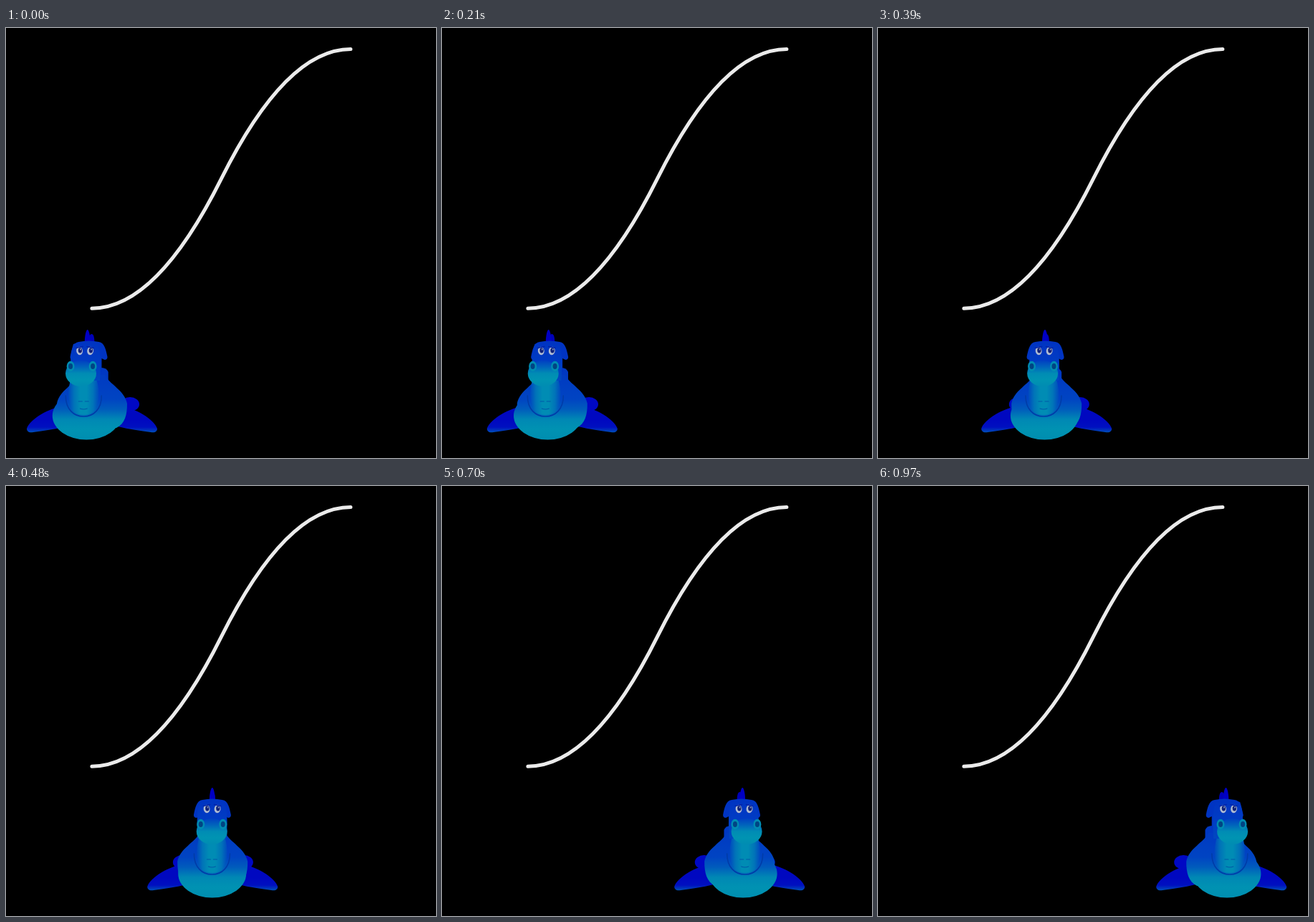
An HTML page with a canvas that plays this animation: 600 px wide and 600 px high, repeating every 1000 ms.

```html
<!DOCTYPE html>
<html lang="en">
<head>
<meta charset="utf-8">
<title>Ease in and out</title>
<style>
html, body { margin: 0; width: 100%; height: 100%; overflow: hidden; background: #000; }
canvas { display: block; }
</style>
</head>
<body>
<canvas id="stage" width="600" height="600"></canvas>
<script>
const ctx = document.getElementById('stage').getContext('2d');
const LOOP = 1000, STEPS = 33, RATE = 60, MID = 300, REACH = 180;

const ease = t => t < 0.5 ? 2 * t * t : 1 - 2 * (1 - t) * (1 - t);

function ramp(g, colors) {
  colors.forEach((c, i) => g.addColorStop(i / (colors.length - 1), c));
  return g;
}
const fade = (y0, y1, ...colors) => ramp(ctx.createLinearGradient(0, y0, 0, y1), colors);
const fadeX = (x0, x1, ...colors) => ramp(ctx.createLinearGradient(x0, 0, x1, 0), colors);

const fillPath = (d, fill) => {
  ctx.fillStyle = fill;
  ctx.fill(new Path2D(d));
};

const strokePath = (d, color, width) => {
  ctx.strokeStyle = color;
  ctx.lineWidth = width;
  ctx.lineCap = 'round';
  ctx.stroke(new Path2D(d));
};

function oval(x, y, rx, ry, fill, turn = 0) {
  ctx.fillStyle = fill;
  ctx.beginPath();
  ctx.ellipse(x, y, rx, ry, turn, 0, 7);
  ctx.fill();
}

// Draw a part at its own depth: nearer parts shift further from the middle.
function layer(pos, depth, draw) {
  ctx.save();
  ctx.translate(MID + pos * depth, 0);
  draw();
  ctx.restore();
}

function mirror(draw) {
  draw();
  ctx.scale(-1, 1);
  draw();
}

const drawCurve = () =>
  strokePath('M119.9 391.2Q210.2 391.2 300.4 210.4Q390.6 29.5 480.9 29.5', '#ebebeb', 5);

function drawBody(pos) {
  layer(pos, 0.944, () => mirror(() => oval(43, 525, 13, 10, '#0008c4')));

  layer(pos, 1, () => mirror(() => {
    fillPath('M-38 527C-60 530-87 546-91 559C-91 563-88 565-82 564C-68 562-52 560-36 556Z',
      fade(527, 567, '#000cc4', '#0008c0', '#0008c0', '#0010c0', '#0068b4'));
  }));

  layer(pos, 0.985, () => fillPath('M-20 520V480Q-18 474-10 474H10Q18 474 20 480V520Z', '#0038c2'));

  const skin = fade(490, 574, '#003cc2', '#0040c2', '#0044c2', '#005cbc', '#0088b4', '#0092b2', '#008eb0');
  layer(pos, 1, () => fillPath(
    'M-18 484C-24 497-46 506-49 524C-49 540-46 552-34 558H34C46 552 49 540 49 524C46 506 24 497 18 484Z',
    skin));
  layer(pos, 1.043, () => oval(0, 541, 47.5, 33.5, skin));
}

function drawChest(pos) {
  layer(pos, 1.065, () => {
    fillPath('M-18 490C-22 505-23 518-18 530C-12 543 12 543 18 530C23 518 22 505 18 490Z',
      fadeX(-22, 22, '#0044c0', '#0074b8', '#008cb4', '#008cb4', '#0074b8', '#0044c0'));
    strokePath('M-25 513C-25 532-14 542 0 542C14 542 25 532 25 513', '#003ca8', 1.6);
    strokePath('M-7 521H-2M2 521H7M-5 531Q0 533 5 531', '#0058a8', 1.2);
  });
}

function drawHead(pos) {
  layer(pos, 1.003, () => fillPath('M-4 441C-4 432-3 427 0 427C3 427 4 432 4 441Z', '#0000b8'));
  layer(pos, 1.035, () => fillPath('M-4 441C-4 429-2 421 0 421C2 421 4 429 4 441Z', '#0000c4'));

  layer(pos, 1.025, () => fillPath(
    'M-14 438Q0 435 14 438C22 439 24 449 26 459Q26 463 22 463L18 461V480H-18V461L-22 463Q-26 463-26 459C-24 449-22 439-14 438Z',
    '#0034c2'));

  layer(pos, 1.05, () => {
    fillPath('M-17 441Q0 435 17 441C20 450 21 460 21 472L20 492H-20L-21 472C-21 460-20 450-17 441Z',
      fade(438, 492, '#0034c2', '#003cc4', '#0048c0'));
  });

  layer(pos, 1.086, () => {
    oval(0, 482, 21.5, 18, fade(464, 500, '#0040c2', '#0064bc', '#008cb4', '#0094b2', '#008cb2'));
  });

  layer(pos, 1.08, () => mirror(() => {
    oval(15.5, 472, 5.5, 7.2, '#008cb2');
    oval(15.5, 472, 3, 4, '#004484');
  }));

  layer(pos, 1.055, () => {
    for (const side of [-1, 1]) {
      const x = side * 7.5;
      oval(x, 450.5, 4.4, 5.7, '#b0bcd2', side * 0.15);
      oval(x + 0.8, 449.8, 2.7, 3.6, '#102078');
      oval(x + 1.5, 448.5, 0.9, 1, '#98a8c8');
      strokePath(`M${x - side * 4.5} 444.5L${x + side * 4.5} 446.5`, '#0024a8', 1.6);
    }
  });
}

function frame(now) {
  const ms = now % LOOP;
  // Steps start on multiples of 10 ms; the motion itself ticks at 60 Hz.
  const slot = Math.floor(ms / 10 + 1e-6) * 10;
  const step = Math.floor((slot + 5) * STEPS / LOOP);
  const t = Math.round(step / STEPS * RATE) / RATE;
  const pos = (ease(t) * 2 - 1) * REACH;

  ctx.fillStyle = '#000';
  ctx.fillRect(0, 0, 600, 600);
  drawCurve();
  drawBody(pos);
  drawChest(pos);
  drawHead(pos);
}

let start;
function tick(now) {
  start ??= now;
  frame(now - start);
  requestAnimationFrame(tick);
}
frame(0);
requestAnimationFrame(tick);
</script>
</body>
</html>
```
